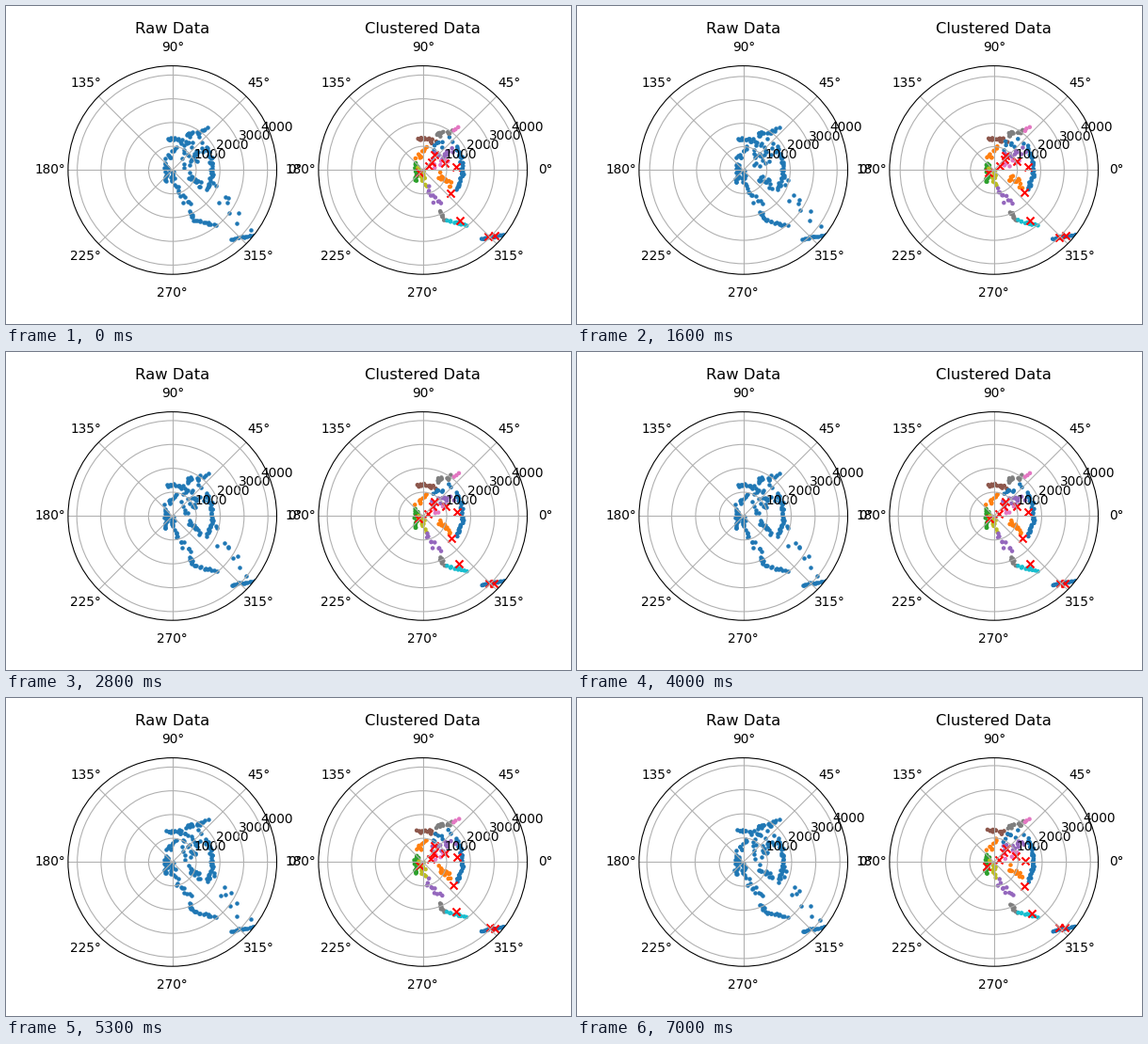
A matplotlib script for the animation above (7.1 s loop, 600 by 338 pixels).

```python
import numpy as np
import matplotlib.pyplot as plt
from matplotlib.animation import FuncAnimation

WIDTH, HEIGHT, DPI = 600, 338, 100
INTERVAL, FRAMES = 100, 71
SCALE = 0.983                     # text and line scale
RADIUS = 110.8                    # radius of a polar plot in pixels
CENTER_Y = 174.4
SCAN_STARTS = [500, 2400, 4400, 6400]
OUTER_RINGS = [101, 99.5, 101.5, 101, 102.5]   # pixel radius of the 4000 circle

plt.rcParams.update({
    "font.family": "DejaVu Sans",
    "font.size": 10 * SCALE,
    "axes.linewidth": 0.8 * SCALE,
    "grid.linewidth": 0.8 * SCALE,
})

# Surfaces met by the scanner: cluster colour (None is noise), number of
# points, spread, and a path in pixels from the scanner, y up.
SURFACES = [
    ("C0", 32, 1.5, [(36, 24), (42, 8), (42, -8), (36, -20)]),
    ("C2", 16, 1.8, [(-7, 8), (-7, -13)]),
    ("C8", 12, 2.5, [(-2, 2), (2, -16)]),
    ("C1", 9, 2.5, [(-5, 12), (1, 24)]),
    ("C5", 13, 2.0, [(-6, 32), (13, 31)]),
    ("C0", 8, 4.0, [(10, 22), (28, 32)]),
    ("C7", 14, 2.2, [(14, 38), (29, 41)]),
    ("C6", 3, 1.2, [(32, 43), (39, 45)]),
    ("C4", 12, 4.0, [(10, 14), (32, 20)]),
    ("C1", 14, 4.0, [(18, -8), (32, -14)]),
    ("C6", 6, 3.0, [(10, 5), (28, 8)]),
    ("C4", 10, 2.5, [(4, -20), (18, -38)]),
    ("C7", 8, 2.0, [(17, -44), (24, -54)]),
    ("C9", 10, 1.0, [(26, -54), (46, -58)]),
    ("C0", 15, 0.8, [(62, -73), (87, -69)]),
    (None, 10, 5.0, [(44, -12), (56, -36), (80, -58)]),
]
CENTROIDS = [(-5, -3), (6, 3), (11, 10), (13, 16), (24, 8), (36, 4),
             (31, -25), (38, -53), (70, -70), (76, -70)]


def walk(path, count):
    """Evenly spaced points along a polyline."""
    path = np.array(path, float)
    lengths = np.hypot(*np.diff(path, axis=0).T)
    along = np.append(0, np.cumsum(lengths))
    steps = np.linspace(0, along[-1], count)
    return np.column_stack([np.interp(steps, along, axis) for axis in path.T])


def to_polar(points, rmax):
    x, y = points.T
    return np.column_stack([np.arctan2(y, x), np.hypot(x, y) * rmax / RADIUS])


def make_scan(number, outer_ring):
    """The room stays in place; each scan adds its own measuring error."""
    room = np.random.default_rng(7)
    error = np.random.default_rng(number)
    points, colors = [], []
    for color, count, spread, path in SURFACES:
        surface = walk(path, count)
        surface += room.uniform(-spread, spread, surface.shape)
        surface += error.uniform(-spread, spread, surface.shape) / 2
        points.append(surface)
        colors += [color] * count
    rmax = 4000 * RADIUS / outer_ring
    polar = to_polar(np.vstack(points), rmax)
    marks = CENTROIDS + error.normal(0, 1.2, (len(CENTROIDS), 2))
    kept = [color is not None for color in colors]
    return {
        "rmax": rmax,
        "raw": polar,
        "clustered": polar[kept],
        "colors": [color for color in colors if color],
        "marks": to_polar(marks, rmax),
    }


scans = [make_scan(i, ring) for i, ring in enumerate(OUTER_RINGS)]

fig = plt.figure(figsize=(WIDTH / DPI, HEIGHT / DPI), dpi=DPI, facecolor="white")


def polar_axes(center_x, title):
    rect = [(center_x - RADIUS) / WIDTH, 1 - (CENTER_Y + RADIUS) / HEIGHT,
            2 * RADIUS / WIDTH, 2 * RADIUS / HEIGHT]
    ax = fig.add_axes(rect, projection="polar")
    ax.set_yticks([1000, 2000, 3000, 4000])
    ax.set_title(title, fontsize=12 * SCALE, y=1.155, pad=0)
    return ax


raw_ax = polar_axes(176.7, "Raw Data")
cluster_ax = polar_axes(442.7, "Clustered Data")
raw_dots = raw_ax.scatter([], [], s=10.5, color="C0", linewidths=0)
cluster_dots = cluster_ax.scatter([], [], s=10.5, linewidths=0)
centroids = cluster_ax.scatter([], [], s=34, c="red", marker="x",
                               linewidths=1.5 * SCALE)


def update(frame):
    scan = scans[np.searchsorted(SCAN_STARTS, frame * INTERVAL, side="right")]
    for ax in (raw_ax, cluster_ax):
        ax.set_ylim(0, scan["rmax"])
    raw_dots.set_offsets(scan["raw"])
    cluster_dots.set_offsets(scan["clustered"])
    cluster_dots.set_facecolor(scan["colors"])
    centroids.set_offsets(scan["marks"])
    return raw_dots, cluster_dots, centroids


animation = FuncAnimation(fig, update, frames=FRAMES, interval=INTERVAL,
                          repeat=True, repeat_delay=0)
plt.show()
```
